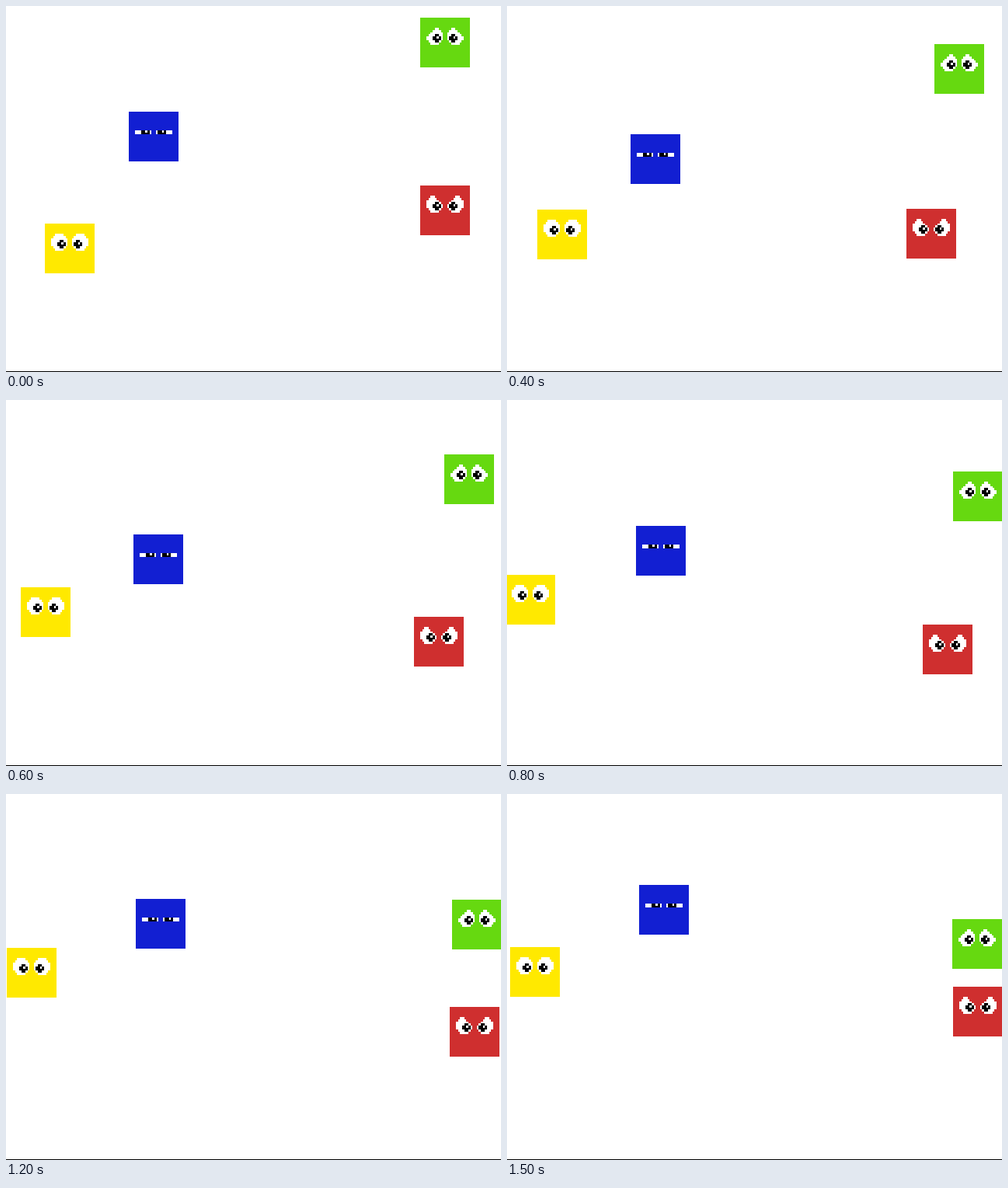
An HTML page with a canvas that plays this animation: 637x471 px, repeating every 5.1 s.

```html
<!DOCTYPE html>
<html lang="en">
<head>
<meta charset="utf-8">
<title>Bouncing blocks</title>
<style>
html, body { margin: 0; width: 100%; height: 100%; overflow: hidden; background: #fff; }
canvas { display: block; }
</style>
</head>
<body>
<canvas id="stage" width="637" height="471"></canvas>
<script>
const ctx = document.getElementById('stage').getContext('2d');
const LOOP = 5100, STEP = 100, LAST = 15, SIZE = 64, GRID = 24;

// Left eye, first and last white cell of each row; the right eye is mirrored.
const lower = ['07', '07', '16', '25'];
const round = ['25', '16', '07', '07', ...lower];
const sad = ['45', '36', '27', '17', ...lower];
const angry = ['23', '14', '05', '06', ...lower];
const sleepy = ['', '', '', '', '07', '07', '', ''];
const pupil = ['', '', '', '12', '03', '03', '12', ''];

const steps = [0, 2, 4, 6, 8, 12, 15];
const blocks = [
  { color: '#66d910', eye: sad,
    x: [533, 539, 550, 564, 574, 574, 573], y: [15, 32, 49, 70, 92, 136, 161] },
  { color: '#121fd2', eye: sleepy,
    x: [158, 161, 159, 164, 166, 167, 170], y: [136, 151, 165, 173, 162, 135, 117] },
  { color: '#cf2f2f', eye: angry,
    x: [533, 515, 514, 525, 535, 571, 574], y: [231, 251, 261, 279, 289, 274, 248] },
  { color: '#ffe900', eye: round,
    x: [50, 48, 39, 19, -2, 1, 4], y: [280, 269, 262, 241, 225, 198, 197] }
];

// Smooth path through the points that never overshoots them.
function follow(v, t) {
  const end = steps.length - 1;
  const rise = i => (v[i + 1] - v[i]) / (steps[i + 1] - steps[i]);
  const slope = i => {
    if (i === 0) return rise(0);
    if (i === end) return rise(end - 1);
    const a = rise(i - 1), b = rise(i);
    return a * b <= 0 ? 0 : 2 * a * b / (a + b);
  };
  let i = 0;
  while (i < end - 1 && t >= steps[i + 1]) i++;
  const w = steps[i + 1] - steps[i], u = (t - steps[i]) / w;
  const s = u * u * (3 - 2 * u);
  return Math.round(v[i] + (v[i + 1] - v[i]) * s
    + w * u * (1 - u) * (slope(i) * (1 - u) - slope(i + 1) * u));
}

const edge = n => Math.round(n * SIZE / GRID);

function cells(col, row, count, color) {
  ctx.fillStyle = color;
  ctx.fillRect(edge(col), edge(row),
    edge(col + count) - edge(col), edge(row + 1) - edge(row));
}

function drawEye(shape, left, pupilLeft, mirror) {
  shape.forEach((span, i) => {
    if (!span) return;
    const row = 5 + i, [a, b] = [...span].map(Number);
    cells(left + (mirror ? 7 - b : a), row, b - a + 1, '#fff');
    if (pupil[i]) {
      const [p, q] = [...pupil[i]].map(Number);
      cells(pupilLeft + p, row, q - p + 1, '#000');
    }
  });
  cells(pupilLeft + 2, 9, 1, '#fff');
}

function draw(now) {
  const step = Math.min(LAST, Math.floor(now % LOOP / STEP));
  ctx.fillStyle = '#fff';
  ctx.fillRect(0, 0, 637, 471);
  ctx.fillStyle = '#000';
  ctx.fillRect(0, 470, 637, 1);
  for (const b of blocks) {
    ctx.save();
    ctx.translate(follow(b.x, step), follow(b.y, step));
    ctx.fillStyle = b.color;
    ctx.fillRect(0, 0, SIZE, SIZE);
    drawEye(b.eye, 3, 6, false);
    drawEye(b.eye, 13, 14, true);
    ctx.restore();
  }
}

const start = performance.now();
function tick() {
  draw(performance.now() - start);
  requestAnimationFrame(tick);
}
tick();
</script>
</body>
</html>
```
